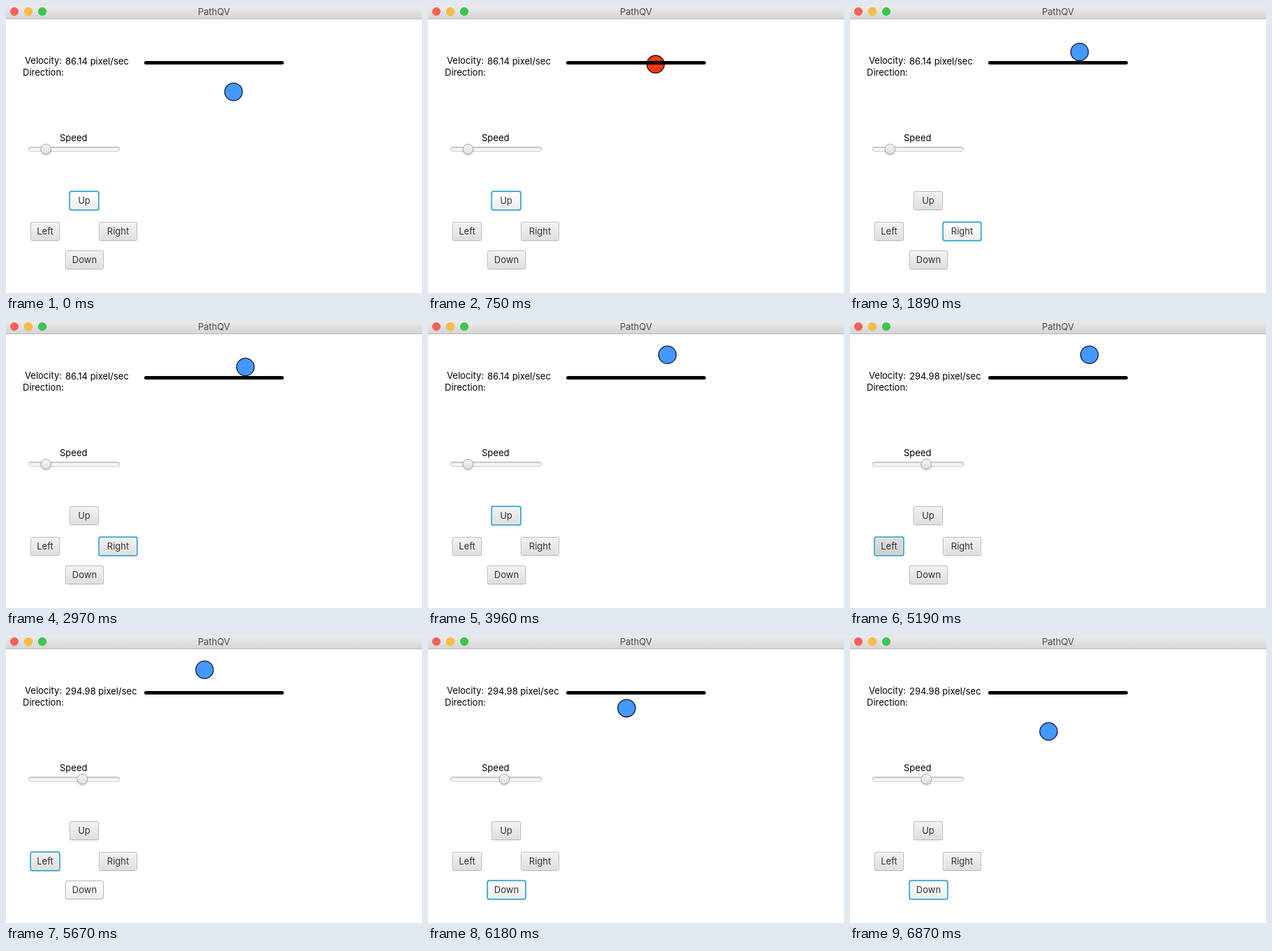
Animation of 596x412 px, one loop 7.05 s. Source, as an HTML page with a canvas:

```html
<!DOCTYPE html>
<html lang="en">
<head>
<meta charset="utf-8">
<title>PathQV</title>
<style>
html, body { margin: 0; width: 100%; height: 100%; overflow: hidden; background: #fff; }
canvas { display: block; width: 596px; height: 412px; }
</style>
</head>
<body>
<canvas id="stage"></canvas>
<script>
const W = 596, H = 412, LOOP = 7050;
const canvas = document.getElementById('stage');
const ctx = canvas.getContext('2d');
const ratio = window.devicePixelRatio || 1;
canvas.width = W * ratio;
canvas.height = H * ratio;

const buttons = {
  Up: [91, 266, 42, 27],
  Left: [35, 310, 42, 27],
  Right: [133, 310, 55, 27],
  Down: [85, 351, 55, 27]
};

// Each move: start, end, target x, target y
const moves = [
  [0, 90, 326, 117.7],
  [120, 405, 326, 100.7],
  [450, 735, 326, 83.6],
  [840, 1125, 326, 66],
  [1840, 2140, 343, 66],
  [3570, 3860, 343, 48.5],
  [5250, 5540, 284.5, 48.5],
  [5910, 6200, 284.5, 107.5],
  [6720, 6870, 284.5, 137]
];

const focusChanges = [[0, 'Up'], [1770, 'Right'], [3480, 'Up'], [4260, 'slider'], [5160, 'Left'], [5820, 'Down']];
const hovers = [['Up', 0, 1380], ['Right', 1680, 2610], ['Up', 3000, 3930], ['slider', 4140, 4920],
  ['Left', 4980, 5610], ['Down', 5670, LOOP]];
const presses = [['Up', 60, 120], ['Up', 390, 450], ['Up', 780, 840], ['Right', 1770, 1830],
  ['Up', 3480, 3570], ['Left', 5160, 5250], ['Down', 5820, 5910], ['Down', 6640, 6720]];

const active = (spans, name, t) => spans.some(([n, a, b]) => n === name && t >= a && t < b);
const progress = (t, a, b) => Math.min(1, Math.max(0, (t - a) / (b - a)));

function ballAt(t) {
  let x = 326, y = 123.3;
  for (const [a, b, toX, toY] of moves) {
    const p = progress(t, a, b);
    x += (toX - x) * p;
    y += (toY - y) * p;
  }
  return [x, y];
}

function gradient(y, h, top, bottom) {
  const g = ctx.createLinearGradient(0, y, 0, y + h);
  g.addColorStop(0, top);
  g.addColorStop(1, bottom);
  return g;
}

function box(x, y, w, h, r, fill) {
  ctx.beginPath();
  ctx.roundRect(x, y, w, h, r);
  ctx.fillStyle = fill;
  ctx.fill();
}

function disc(x, y, r, fill, stroke, width = 1) {
  ctx.beginPath();
  ctx.arc(x, y, r, 0, Math.PI * 2);
  ctx.fillStyle = fill;
  ctx.fill();
  if (stroke) {
    ctx.strokeStyle = stroke;
    ctx.lineWidth = width;
    ctx.stroke();
  }
}

function label(text, x, y, color = '#000', align = 'left') {
  ctx.font = '13px Inter, sans-serif';
  ctx.textAlign = align;
  ctx.fillStyle = color;
  ctx.fillText(text, x, y);
}

function drawTitleBar() {
  ctx.fillStyle = gradient(0, 18, '#ebebeb', '#d5d5d5');
  ctx.fillRect(0, 0, W, 18);
  ctx.fillStyle = '#b9b9b9';
  ctx.fillRect(0, 18, W, 1);
  disc(12, 8, 5.7, '#f9605a', '#e2504a', 0.6);
  disc(32, 8, 5.7, '#fdbd3f', '#dfa23a', 0.6);
  disc(52, 8, 5.7, '#3ac84c', '#30ad3c', 0.6);
  label('PathQV', 298, 13, '#4a4a4a', 'center');
}

function drawButton(name, focus, t) {
  const [x, y, w, h] = buttons[name];
  let top = '#f3f3f3', bottom = '#dddddd';
  if (active(presses, name, t)) [top, bottom] = ['#dedede', '#cdcdcd'];
  else if (active(hovers, name, t)) [top, bottom] = ['#ffffff', '#ebebeb'];

  if (focus === name) {
    box(x - 1.6, y - 1.6, w + 3.2, h + 3.2, 4, '#cdebf6');
    box(x - 0.5, y - 0.5, w + 1, h + 1, 3, '#2f9fcb');
  } else {
    box(x, y + 1, w, h, 3, '#f0f0f0');
    box(x, y, w, h, 3, '#b5b5b5');
  }
  box(x + 1, y + 1, w - 2, h - 2, 2, '#fbfbfb');
  box(x + 1.6, y + 2, w - 3.2, h - 3.2, 2, gradient(y, h, top, bottom));
  label(name, x + w / 2, y + 18.3, '#333', 'center');
}

function drawSlider(x, focus, t) {
  box(32, 202, 131, 7, 3.5, gradient(202, 7, '#b4b4b4', '#cccccc'));
  box(33, 203.3, 129, 4.7, 2.4, gradient(203, 5, '#e6e6e6', '#ffffff'));
  disc(x, 207.5, 8.3, 'rgba(0,0,0,0.06)');
  disc(x, 206.5, 8, 'rgba(0,0,0,0.06)');
  const focused = focus === 'slider';
  if (focused) disc(x, 205.5, 8.8, '#cdebf6');
  const top = active(hovers, 'slider', t) ? '#ffffff' : '#f5f5f5';
  disc(x, 205.5, 7.3, gradient(198, 15, top, '#dedede'), focused ? '#2f9fcb' : '#a6a6a6');
}

function draw(t) {
  ctx.setTransform(ratio, 0, 0, ratio, 0, 0);
  ctx.fillStyle = '#fff';
  ctx.fillRect(0, 0, W, H);
  drawTitleBar();

  const drag = progress(t, 4320, 4800);
  const eased = drag * drag * (3 - 2 * drag);
  const velocity = 86.14 + (294.98 - 86.14) * eased;
  label('Velocity:', 27, 83);
  label(velocity.toFixed(2) + ' pixel/sec', 85, 84);
  label('Direction:', 24, 100);
  label('Speed', 77, 194);

  const focus = focusChanges.filter(([start]) => start <= t).pop()[1];
  drawSlider(57.3 + 52 * eased, focus, t);
  for (const name in buttons) drawButton(name, focus, t);

  const [x, y] = ballAt(t);
  const touching = Math.abs(y - 81.5) < 15.4;
  disc(x, y, 12.6, touching ? '#f83a0a' : '#4499ff', '#14142e', 1.3);
  box(198, 79, 200, 5, 2.5, '#000');
}

function tick() {
  draw(performance.now() % LOOP);
  requestAnimationFrame(tick);
}
tick();
</script>
</body>
</html>
```
